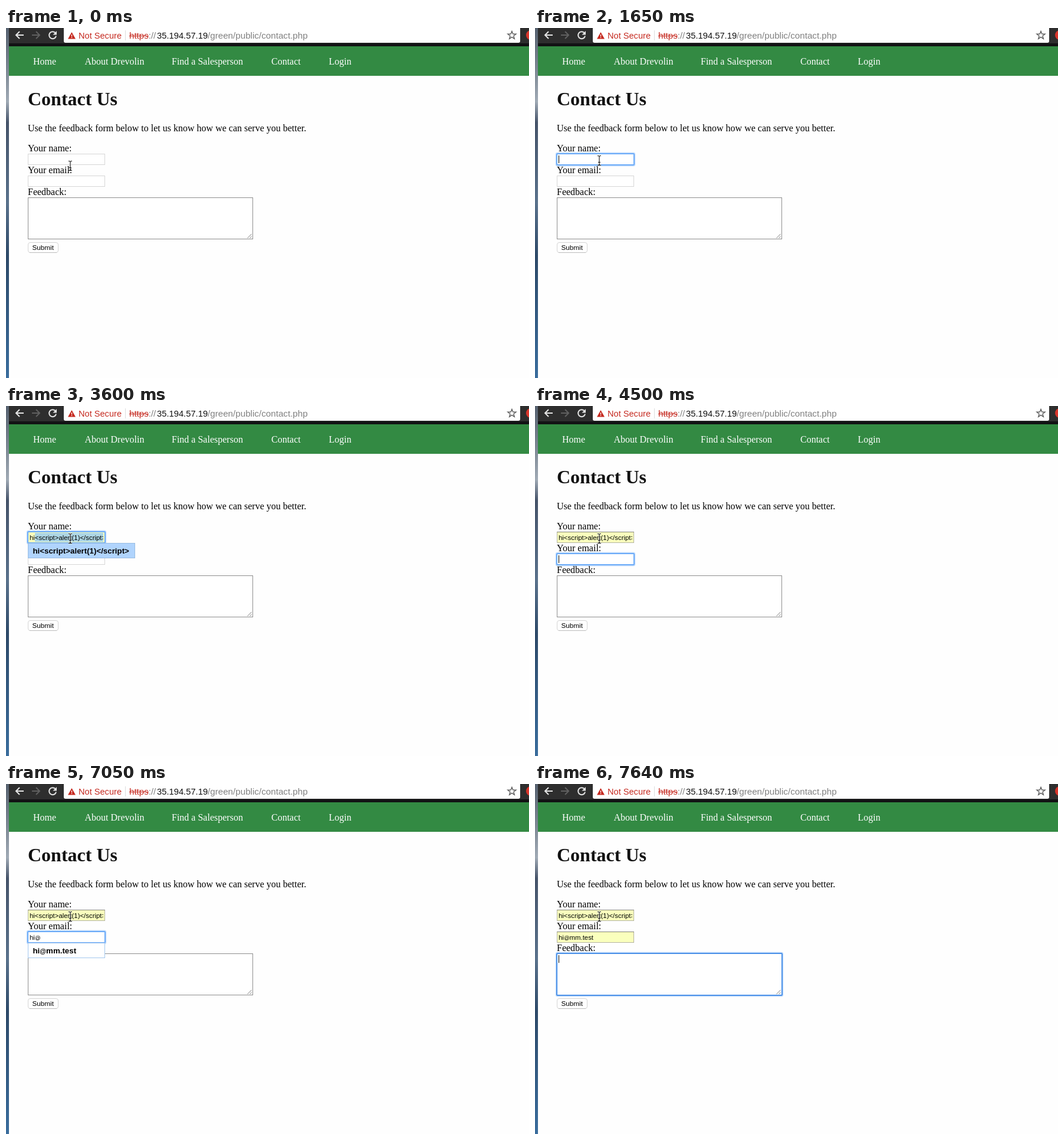
These frames come from a looping animation (887x593 px, 8000 ms). An HTML page:

```html
<!DOCTYPE html>
<html lang="en">
<head>
<meta charset="utf-8">
<title>Contact form</title>
<style>
html, body { margin: 0; width: 100%; height: 100%; overflow: hidden; background: #fefefe; }
svg { display: block; }
text { font-family: 'Liberation Serif', Times, serif; font-size: 16px; white-space: pre; }
.ui { font-family: 'Liberation Sans', Arial, sans-serif; font-size: 11.4px; }
.item { font-size: 13.3px; font-weight: bold; }
.at { font-size: .83em; }
.line { fill: none; stroke-width: 2; }
</style>
</head>
<body>
<svg width="887" height="593" viewBox="0 0 887 593">
  <defs>
    <linearGradient id="wall" x1="0" y1="0" x2="0" y2="1">
      <stop offset="0" stop-color="#56616f"/>
      <stop offset=".12" stop-color="#7d8894"/>
      <stop offset=".21" stop-color="#a0aab5"/>
      <stop offset=".27" stop-color="#46546a"/>
      <stop offset=".5" stop-color="#5a728c"/>
      <stop offset=".65" stop-color="#2e4a69"/>
      <stop offset="1" stop-color="#3a6d9d"/>
    </linearGradient>
    <clipPath id="inner"><rect x="38" y="210" width="127" height="60"/></clipPath>
  </defs>
  <rect width="887" height="593" fill="#fefefe"/>
  <rect width="5" height="593" fill="url(#wall)"/>

  <!-- browser bar -->
  <rect x="5" width="882" height="31" fill="#2e2e2e"/>
  <rect x="5" y="26" width="882" height="5" fill="#121214"/>
  <rect x="98" y="-5" width="774" height="30" rx="3" fill="#fff"/>
  <path class="line" stroke="#e4e4e4" d="M30 12H17.5M23 6l-6 6 6 6"/>
  <path class="line" stroke="#606060" d="M44 12h12.5M51 6l6 6-6 6"/>
  <path class="line" stroke="#e4e4e4" d="M83.5 8A6 6 0 1 0 85 13.5"/>
  <path fill="#e4e4e4" d="M86 5v6.500h-6.500z"/>
  <path fill="#c5291f" d="M111.500 7l6.500 11.500h-13z"/>
  <path stroke="#fff" stroke-width="1.300" d="M111.500 11v3.500M111.500 15.500v1.500"/>
  <path stroke="#ddd" d="M202.500 4v17"/>
  <g class="bar">
    <text class="ui" x="123" y="18" fill="#c5291f" style="font-size:14.600px">Not Secure</text>
    <text class="ui" x="209" y="18" fill="#c5291f" style="font-size:15.100px">https<tspan fill="#808080">://</tspan></text>
    <path stroke="#c5291f" d="M209 13.500h33"/>
    <text class="ui" x="256" y="18" fill="#111" style="font-size:14.750px">35.194.57.19</text>
    <text class="ui" x="342" y="18" fill="#808080" style="font-size:15.200px">/green/public/contact.php</text>
  </g>
  <polygon fill="none" stroke="#5a5a5a" stroke-width="1.400" points="858,5.500 859.800,10 865,10.200 860.900,13.400 862.300,18.300 858,15.400 853.700,18.300 855.100,13.400 851,10.200 856.200,10"/>
  <circle cx="890" cy="12" r="8" fill="#d8352b"/>

  <!-- page -->
  <rect x="5" y="31" width="882" height="50" fill="#338a43"/>
  <g fill="#fff">
    <text x="46" y="62">Home</text>
    <text x="133.500" y="62">About Drevolin</text>
    <text x="281" y="62">Find a Salesperson</text>
    <text x="450" y="62">Contact</text>
    <text x="547.500" y="62">Login</text>
  </g>
  <text x="37" y="131" style="font-size:32px;font-weight:bold" fill="#111">Contact Us</text>
  <text x="37" y="175">Use the feedback form below to let us know how we can serve you better.</text>
  <text x="37" y="209">Your name:</text>
  <text x="37" y="246">Your email:</text>
  <text x="37" y="283">Feedback:</text>
  <rect x="37.500" y="363.500" width="51" height="17" rx="3.500" fill="#fff" stroke="#d4d4d4"/>
  <path stroke="#bcbcbc" d="M40 380.500h46"/>
  <text class="ui" x="44.500" y="376" style="font-size:11.700px">Submit</text>

  <g id="form"></g>
  <g id="pointer" fill="none">
    <path id="beam" stroke="#fff" stroke-opacity=".7" stroke-width="2.600" d="M106 .500h1.500q1.500 0 1.500 2v12q0 2-1.500 2H106M112 .500h-1.500q-1.500 0-1.500 2M109 14.500q0 2 1.500 2h1.500M107 11.500h4"/>
    <use href="#beam" style="display:none"/>
  </g>
</svg>
<script>
const LOOP = 8000;
const NAME = 'hi&lt;script>alert(1)&lt;/script>';
const AT = '<tspan class="at">@</tspan>';
const EMAIL = `hi${AT}mm.test`;
const CARET_ON = [[1650, 2250], [2400, 3000], [3450, 3600], [4500, 5100],
  [5550, 6000], [6150, 7050], [7640, 8000]];

const form = document.getElementById('form');
const pointer = document.getElementById('pointer');

// dark stroke over the pale halo of the pointer
const ink = document.getElementById('beam').cloneNode();
ink.removeAttribute('id');
ink.setAttribute('stroke', '#111');
ink.setAttribute('stroke-opacity', 1);
ink.setAttribute('stroke-width', 1.1);
pointer.lastElementChild.replaceWith(ink);

const rect = (x, y, w, h, fill, more = '') =>
  `<rect x="${x}" y="${y}" width="${w}" height="${h}" fill="${fill}" ${more}/>`;

const box = (x, y, w, h, fill, stroke) =>
  rect(x + .5, y + .5, w - 1, h - 1, fill, `stroke="${stroke}"`);

const ring = (y, w, h, color) =>
  rect(36, y - 1, w + 2, h + 2, 'none', 'rx="2.5" stroke="#69a9f7" stroke-opacity=".35" stroke-width="3"') +
  rect(37, y, w, h, 'none', `rx="1" stroke="${color}" stroke-width="2"`);

// picked: x range of the suggested part while it is previewed
function field(y, { text = '', filled, focus, picked }) {
  let out = box(37, y, 131, 19, filled || picked ? '#faffbd' : '#fff', filled ? '#b4b4a0' : '#d6d6d6');
  if (filled) out += `<path stroke="#85857a" d="M37 ${y + .5}h131"/>`;
  if (picked) out += rect(picked[0], y + 2, picked[1] - picked[0], 15, '#add6e4');
  if (focus) out += ring(y, 131, 19, '#6aaaf8');
  return out + `<text class="ui" x="40" y="${y + 14}" clip-path="url(#inner)">${text}</text>`;
}

function textarea(focus) {
  return box(37, 287, 382, 71, '#fff', '#8e8e8e') +
    '<path stroke="#777" d="M409.500 356l7-7M413.500 356l3-3"/>' +
    (focus ? ring(287, 382, 71, '#4a90e8') : '');
}

const menu = (y, w, text, picked) =>
  box(37, y, w, 26, picked ? '#b0d4fd' : '#fff', picked ? '#98bce2' : '#a3c7ee') +
  `<text class="ui item" x="45.500" y="${y + 18}">${text}</text>`;

function scene(t) {
  const inName = t >= 1650 && t < 4500;
  const inEmail = t >= 4500 && t < 7640;
  const inFeedback = t >= 7640;
  const namePreview = inName && t >= 3600;
  const emailPreview = inEmail && t >= 7500;

  const name = t >= 3600 ? NAME : t >= 2400 ? 'hi' : '';
  const email = t >= 7500 ? EMAIL : t >= 6450 ? 'hi' + AT : t >= 6150 ? 'hi' : '';

  let out = field(213, { text: name, filled: t >= 4500, focus: inName, picked: namePreview && [49, 165] }) +
    field(250, { text: email, filled: inFeedback, focus: inEmail, picked: emailPreview && [58, 100] }) +
    textarea(inFeedback);

  if (inName && t >= 2400) out += menu(232, 182, NAME, namePreview);
  if (inEmail && t >= 6150) out += menu(269, 131, EMAIL, emailPreview);

  if (CARET_ON.some(([from, to]) => t >= from && t < to)) {
    const typed = inName ? name : inEmail ? email : '';
    const x = !typed ? 40 : typed === 'hi' ? 49 : 58;
    out += rect(x, inName ? 216 : inEmail ? 253 : 290, 1, 13, '#000');
  }
  return out;
}

let shown;
function draw() {
  const t = performance.now() % LOOP;
  const next = scene(t);
  if (next !== shown) form.innerHTML = shown = next;
  pointer.setAttribute('transform', `translate(0 ${t < 1350 ? 225 : t < 1500 ? 221 : 216})`);
  requestAnimationFrame(draw);
}
draw();
</script>
</body>
</html>
```
